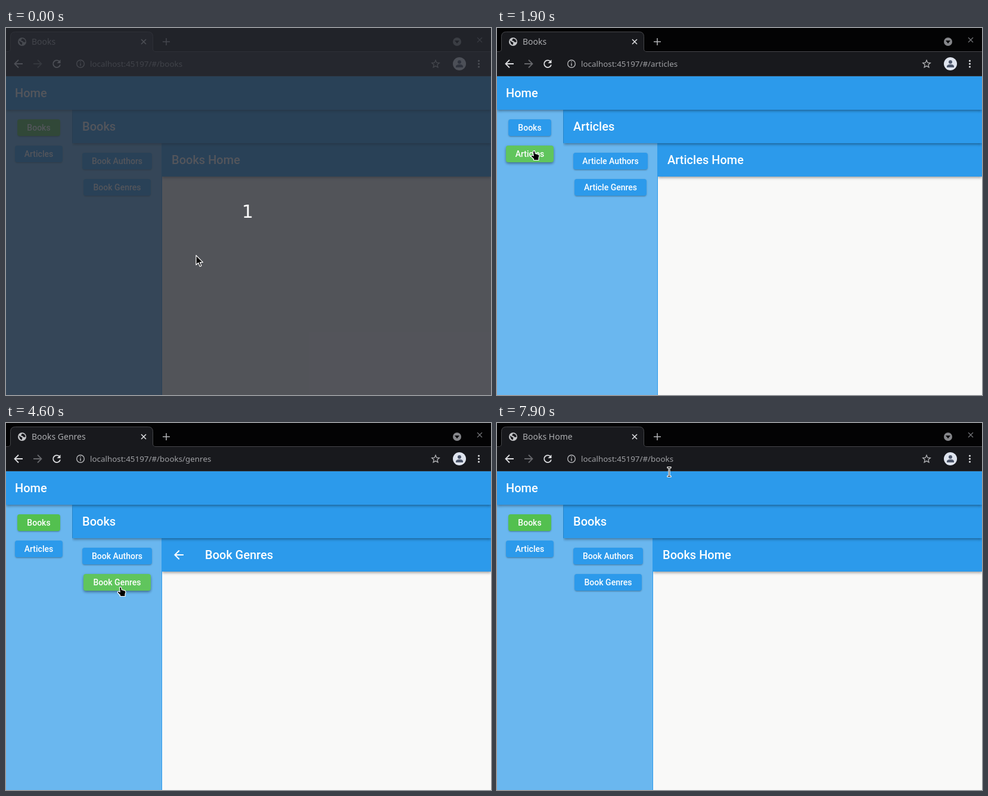
These frames come from a looping animation (814x615 px, 8 s). An HTML page:

```html
<!DOCTYPE html>
<html lang="en">
<head>
<meta charset="utf-8">
<title>Nested navigation</title>
<style>
  html, body { margin: 0; width: 100%; height: 100%; overflow: hidden; background: #000; }
  #stage { position: relative; width: 814px; height: 615px; overflow: hidden; background: #f9f9f8; font-family: Roboto, sans-serif; color: #fff; }
  #stage div, #stage svg { position: absolute; box-sizing: border-box; white-space: pre; }
  #chrome, #cursor { left: 0; top: 0; }
  #chrome { font-family: "Noto Sans", sans-serif; }
  .bar { height: 56px; right: 0; background: #2c9aeb; font: 500 20px/57px Roboto, sans-serif;
    box-shadow: 0 2px 4px -1px rgba(0,0,0,.2), 0 3px 4px rgba(0,0,0,.14), 0 1px 6px rgba(0,0,0,.1); }
  .bar span { position: absolute; left: 16px; top: 0; }
  .side { background: #6ab7ef; border-right: 1px solid #2c9aeb; bottom: 0; }
  .btn { height: 28px; border-radius: 4px; background: #2c9aeb; text-align: center; font: 500 14px/29px Roboto, sans-serif;
    box-shadow: 0 2px 2px -1px rgba(0,0,0,.2), 0 1px 3px rgba(0,0,0,.18); }
  .btn.on { background: #53c04f; }
  .btn.hover { background-image: linear-gradient(rgba(255,255,255,.08), rgba(255,255,255,.08));
    box-shadow: 0 2px 4px -1px rgba(0,0,0,.24), 0 3px 4px rgba(0,0,0,.16), 0 1px 5px rgba(0,0,0,.12); }
  .btn.press { background-image: linear-gradient(rgba(255,255,255,.2), rgba(255,255,255,.2)); }
  #section { left: 111px; top: 137px; right: 0; bottom: 0; overflow: hidden; }
  #content { top: 56px; right: 0; bottom: 0; overflow: hidden; }
  .page { left: 0; top: 0; width: 100%; height: 100%; background: #f9f9f8; }
  .page .bar { left: 0; top: 0; overflow: visible; }
  .page svg { left: 16px; top: 16px; }
  #ring { left: -7px; top: -7px; width: 70px; height: 70px; border-radius: 50%; background: rgba(0,0,0,.05); }
  #ringBox { left: 0; top: 0; width: 90px; height: 56px; overflow: hidden; }
  #tip { left: 272px; top: 245px; width: 38px; height: 24px; border-radius: 4px; background: rgba(97,97,97,.9); text-align: center; font: 10px/24px Roboto, sans-serif; }
  #shade { left: 0; top: 0; width: 814px; height: 615px; background: rgba(41,43,50,.8); }
  #count { left: 396px; top: 290px; font: 30px/36px "DejaVu Sans", sans-serif; }
</style>
</head>
<body>
<div id="stage">
  <div class="side" style="left:0;top:137px;width:112px"></div>
  <div id="section">
    <div class="side" id="side2" style="left:0;top:56px"></div>
    <div id="content">
      <div class="page" id="base"></div>
      <div class="page" id="top"></div>
    </div>
    <div class="bar" style="left:1px;top:0"><span id="heading"></span></div>
  </div>
  <div class="bar" style="left:0;top:81px"><span style="left:15px">Home</span></div>
  <div id="buttons"></div>
  <div id="tip">Back</div>
  <svg id="chrome" width="814" height="81" fill="none" stroke="#dcdde0" stroke-width="1.8">
    <g stroke="none">
      <rect width="814" height="81" fill="#030304"/>
      <rect y="40" width="814" height="41" fill="#18191d"/>
      <rect y="80" width="814" height="1" fill="#34353a"/>
    </g>
    <path d="M0 39.5H3Q7.500 39.500 7.500 35V14.500Q7.500 6.500 15.500 6.500H238.500Q246.500 6.500 246.500 14.500V35Q246.500 39.500 251 39.500H814" fill="#18191d" stroke="#46474b" stroke-width="1"/>
    <rect y="39" x="5" width="244" height="3" fill="#18191d" stroke="none"/>
    <circle cx="27" cy="23" r="7" fill="#c6c7ca" stroke="none"/>
    <path d="M21.500 21l4 2.500 2 1-1 4-3-2zM27 17.500l4 1.500 2 4-3 1-2-2-3-1z" fill="#18191d" stroke="none"/>
    <path d="M227 19l8 8M235 19l-8 8" stroke-width="1.600"/>
    <path d="M263 23h12M269 17v12" stroke="#b4b5b8" stroke-width="1.500"/>
    <circle cx="757" cy="23" r="7" fill="#85868a" stroke="none"/>
    <path d="M753 21h8l-4 5z" fill="#08080a" stroke="none"/>
    <path d="M791 16l8 8M799 16l-8 8" stroke="#727377" stroke-width="1.300"/>
    <path d="M28 60H15M21 53.500L14.500 60l6.500 6.500"/>
    <path d="M46 60h13M53 53.500l6.500 6.500-6.500 6.500" stroke="#66676b"/>
    <path d="M90 56.500A6 6 0 1 0 91 61.500"/>
    <path d="M91.500 53v6h-6z" fill="#dcdde0" stroke="none"/>
    <circle cx="125" cy="60" r="6.300" stroke="#b4b5b8" stroke-width="1.400"/>
    <path d="M125 59v4.500M125 56v1.500" stroke="#b4b5b8" stroke-width="1.500"/>
    <path d="M721 54l1.800 4.200 4.500.4-3.400 3 1 4.400-3.900-2.400-3.900 2.400 1-4.400-3.400-3 4.500-.4z" stroke="#b4b5b8" stroke-width="1.300"/>
    <g stroke="none">
      <circle cx="761" cy="60" r="11" fill="#dfe4ee"/>
      <circle cx="761" cy="57" r="3" fill="#4c566b"/>
      <path d="M755 66v-1.500q0-3.500 6-3.500t6 3.500V66z" fill="#4c566b"/>
      <g fill="#dcdde0"><circle cx="793.500" cy="55" r="1.600"/><circle cx="793.500" cy="60" r="1.600"/><circle cx="793.500" cy="65" r="1.600"/></g>
      <text id="title" x="43" y="28" font-size="14" fill="#abacaf"></text>
      <text id="url" x="141" y="65" font-size="13.400" fill="#9fa0a4"></text>
    </g>
  </svg>
  <div id="shade"><div id="count">1</div></div>
  <svg id="cursor" width="814" height="615">
    <g id="pointer" stroke="#fff" stroke-width="1.200" stroke-linejoin="round">
      <path id="arrow" d="M0 0V16L3.800 12.500 6.400 18.600 9 17.500 6.500 11.600H11.500Z"/>
      <path id="hand" d="M-1.600.8Q0-1.200 1.600.8L2.200 4.500 7 5.600Q9 6.200 9 8.500L8 12V15.500H-.5V13.500L-4.500 9.500Q-5.200 7 -3 7L-.8 8.300Z"/>
      <path id="beam" d="M-3-8.500H3V-6.500H1V6.500H3V8.500H-3V6.500H-1V-6.500H-3Z"/>
    </g>
  </svg>
</div>
<script>
const LOOP = 8000, STEP = 100;
const $ = id => document.getElementById(id);

// time, tab title, path, section, selected sub page
const STATES = [
  [0, 'Books', 'books', 'Book', ''],
  [1800, 'Books', 'articles', 'Article', ''],
  [2000, 'Articles Home', 'articles', 'Article', ''],
  [3100, 'Books', 'books', 'Book', ''],
  [3200, 'Books Home', 'books', 'Book', ''],
  [4200, 'Books Home', 'books/genres', 'Book', 'Genres'],
  [4400, 'Books Genres', 'books/genres', 'Book', 'Genres'],
  [5600, 'Books Genres', 'books/authors', 'Book', 'Authors'],
  [5700, 'Books Authors', 'books/authors', 'Book', 'Authors'],
  [6900, 'Books Authors', 'books', 'Book', ''],
  [7000, 'Books Home', 'books', 'Book', '']
];
// time, lower page, upper page, upper offset, upper opacity
const PAGES = [
  [0, 'Home', '', 0, 0],
  [4400, 'Home', 'Genres', 44, .25],
  [4500, 'Home', 'Genres', 8, .7],
  [4600, 'Home', 'Genres', 0, 1],
  [5700, 'Genres', 'Authors', 12, .6],
  [5800, 'Home', 'Authors', 0, 1],
  [7000, 'Home', 'Authors', 6, .6],
  [7100, 'Home', 'Authors', 14, .2],
  [7200, 'Home', '', 0, 0]
];
// time, x, y of the pointer
const PATH = [
  [0, 319, 381], [400, 319, 381], [700, 139, 321], [800, 139, 321], [1400, 62, 206],
  [2500, 62, 206], [2700, 65, 165], [3300, 65, 165], [3800, 192, 275], [4700, 192, 275],
  [5200, 198, 235], [5300, 198, 235], [5400, 197, 233], [5900, 197, 233], [6300, 282, 223],
  [6400, 281, 222], [6500, 291, 221], [7300, 291, 221], [7400, 297, 222], [7500, 297, 222],
  [7900, 289, 82], [8000, 289, 82]
];
const TIP = [[0, 0], [6400, .22], [6500, 1], [6800, .9], [6900, .35], [7000, 0]];
const PRESSES = [1700, 3000, 4000, 5600];

const at = (rows, t) => rows.filter(r => r[0] <= t).pop();

function pointAt(t) {
  const i = Math.max(1, PATH.findIndex(p => p[0] > t));
  const [t0, x0, y0] = PATH[i - 1], [t1, x1, y1] = PATH[i];
  const k = (t - t0) / (t1 - t0), e = k * k * (3 - 2 * k);
  return [x0 + (x1 - x0) * e, y0 + (y1 - y0) * e];
}

const buttons = [1, 2, 3, 4].map(() => {
  const el = document.createElement('div');
  el.className = 'btn';
  $('buttons').append(el);
  return el;
});

const BACK = '<div id="ringBox"><div id="ring"></div></div>' +
  '<svg width="24" height="24"><path fill="#fff" d="M20 11H7.830l5.590-5.590L12 4l-8 8 8 8 1.410-1.410L7.830 13H20z"/></svg>';

function drawPage(el, section, page, backHover) {
  const home = page === 'Home', key = section + page + backHover;
  el.style.display = page ? 'block' : 'none';
  if (el.dataset.key === key) return;
  el.dataset.key = key;
  const label = home ? section + 's Home' : section + ' ' + page;
  el.innerHTML = `<div class="bar">${home ? '' : BACK}<span style="left:${home ? 16 : 72}px">${label}</span></div>`;
  if (!home) el.querySelector('#ring').style.opacity = backHover ? 1 : 0;
}

function render(now) {
  const t = Math.floor(now % LOOP / STEP) * STEP;
  const [, title, path, section, sub] = at(STATES, t);
  const [, lower, upper, dy, opacity] = at(PAGES, t);
  const [x, y] = pointAt(t);
  const inside = (l, top, w, h) => x >= l && x < l + w && y >= top && y < top + h;
  const wide = section === 'Article' ? 8 : 0;

  $('title').textContent = title;
  $('url').textContent = 'localhost:45197/#/' + path;
  $('heading').textContent = section + 's';
  $('side2').style.width = 151 + wide + 'px';
  $('content').style.left = 151 + wide + 'px';

  const pressed = PRESSES.some(p => t >= p && t < p + 100);
  let hand = false;
  [
    ['Books', 19, 153, 72, section === 'Book'],
    ['Articles', 15, 197, 80, section === 'Article'],
    [section + ' Authors', 128, 209, 117 + wide, sub === 'Authors'],
    [section + ' Genres', 130, 253, 113 + wide, sub === 'Genres']
  ].forEach(([label, l, top, w, on], i) => {
    const b = buttons[i], hover = inside(l, top, w, 28);
    hand = hand || hover;
    b.textContent = label;
    b.style.cssText = `left:${l}px;top:${top}px;width:${w}px`;
    b.classList.toggle('on', on);
    b.classList.toggle('hover', hover);
    b.classList.toggle('press', hover && pressed);
  });

  const back = upper !== '' && t < 7000 && inside(262, 193, 56, 56);
  hand = hand || back;
  drawPage($('base'), section, lower, false);
  drawPage($('top'), section, upper, back);
  $('top').style.transform = `translateY(${dy}px)`;
  $('top').style.opacity = opacity;
  $('tip').style.opacity = at(TIP, t)[1];

  $('shade').style.display = t < 100 ? 'block' : 'none';
  const shape = t >= 7900 ? 'beam' : hand ? 'hand' : 'arrow';
  for (const id of ['arrow', 'hand', 'beam']) $(id).style.display = id === shape ? 'inline' : 'none';
  $('pointer').setAttribute('transform', `translate(${x.toFixed(1)} ${y.toFixed(1)})`);
}

const start = performance.now();
function tick() {
  render(performance.now() - start);
  requestAnimationFrame(tick);
}
tick();
</script>
</body>
</html>
```
